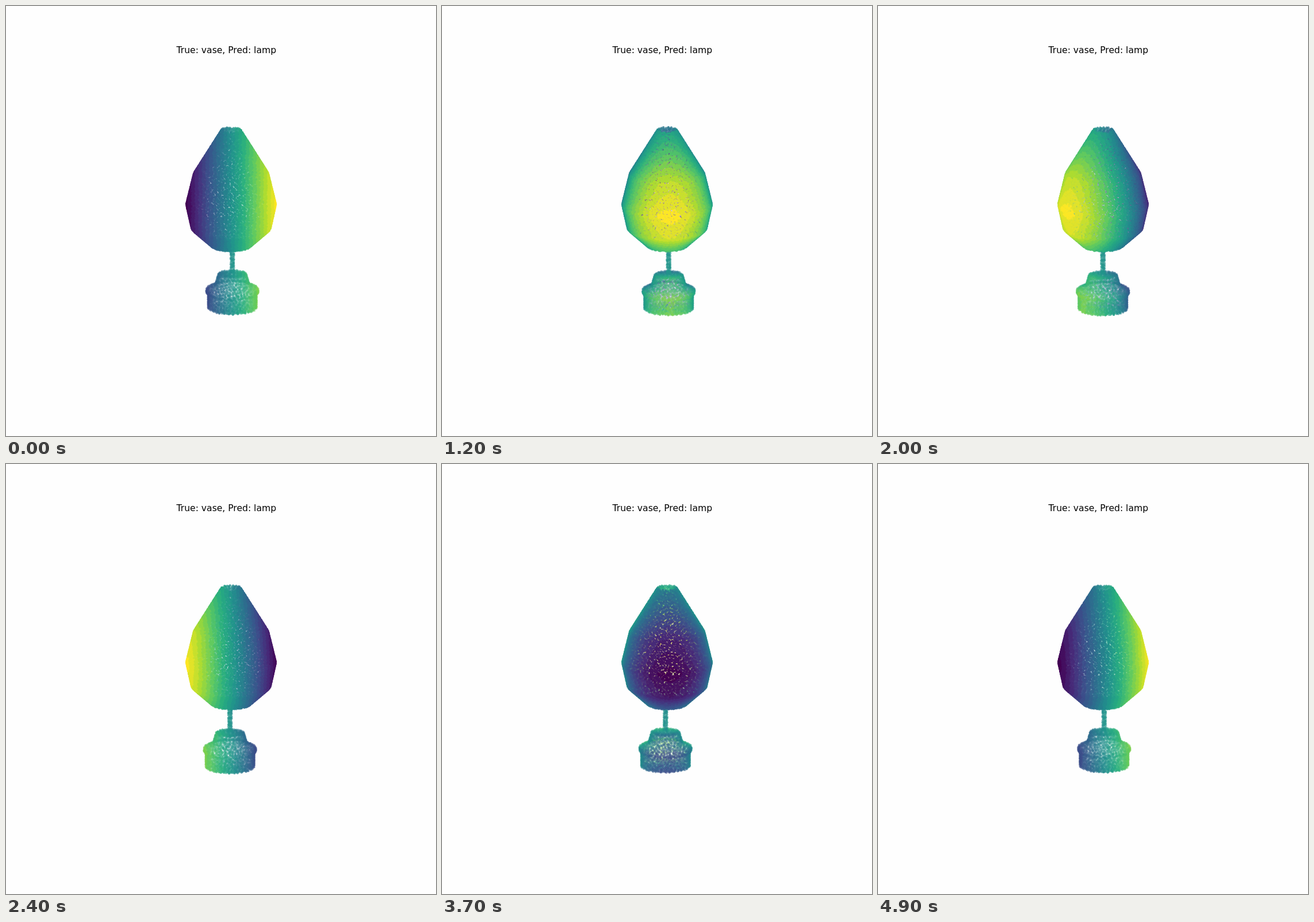
Write an HTML page with a canvas that moves like this. It is 748x748 px and loops after 5000 ms.

```html
<!DOCTYPE html>
<html lang="en">
<head>
<meta charset="utf-8">
<title>Rotating point cloud</title>
<style>
  html, body { margin: 0; width: 100%; height: 100%; overflow: hidden; background: #fefefe; }
  canvas { display: block; }
</style>
</head>
<body>
<canvas id="stage" width="748" height="748"></canvas>
<script>
const ctx = document.getElementById('stage').getContext('2d');
const STEPS = 50, STEP_MS = 100;
const CX = 391.5, MID_Y = 345, MAX_R = 77.5;
const TILT = 0.28, DOT = 2.2;
const GOLDEN = Math.PI * (3 - Math.sqrt(5));
const LEVELS = 26;

const viridis = [
  [68, 1, 84], [71, 44, 122], [59, 81, 139], [44, 113, 142], [33, 144, 141],
  [39, 173, 129], [92, 200, 99], [170, 220, 50], [253, 231, 37]
];

function viridisAt(v) {
  const s = Math.min(Math.max(v, 0), 1) * (viridis.length - 1);
  const i = Math.min(Math.floor(s), viridis.length - 2);
  const mix = viridis[i].map((c, k) => Math.round(c + (viridis[i + 1][k] - c) * (s - i)));
  return `rgb(${mix})`;
}

const palette = Array.from({ length: LEVELS }, (_, i) => viridisAt(i / (LEVELS - 1)));

let seed = 20417;
function rand() {
  seed = (seed * 1664525 + 1013904223) % 4294967296;
  return seed / 4294967296;
}

const points = [];

// Scatter dots evenly over the surface swept by a profile segment.
function sweep(r0, y0, r1, y1, density, ox = 0, oz = 0) {
  const len = Math.hypot(r1 - r0, y1 - y0);
  const count = Math.round(Math.PI * (r0 + r1) * len * density);
  const turn = rand() * 2 * Math.PI;
  for (let i = 0; i < count; i++) {
    const u = (i + 0.5) / count;
    const even = Math.abs(r1 - r0) < 0.01
      ? u
      : (Math.sqrt(r0 * r0 + u * (r1 * r1 - r0 * r0)) - r0) / (r1 - r0);
    const t = Math.min(Math.max(even + (rand() - 0.5) * 2.2 / len, 0), 1);
    const r = r0 + (r1 - r0) * t;
    const a = turn + i * GOLDEN + (rand() - 0.5) * 2.2 / Math.max(r, 2);
    const x = r * Math.cos(a) + ox;
    const z = r * Math.sin(a) + oz;
    const level = Math.round((x / MAX_R + 1) / 2 * (LEVELS - 1));
    points.push({
      x, z, y: y0 + (y1 - y0) * t,
      color: palette[Math.min(Math.max(level, 0), LEVELS - 1)],
      px: 0, py: 0, depth: 0
    });
  }
}

function chain(profile, density, ox, oz) {
  for (let i = 1; i < profile.length; i++) {
    sweep(...profile[i - 1], ...profile[i], density, ox, oz);
  }
}

// Shade
chain([[16.3, 215.5], [64.5, 292.5], [MAX_R, 345], [68.3, 386], [33, 417.5]], 0.1);
sweep(33, 417.5, 4, 418, 0.06);

// Stem and foot stand slightly off the shade's axis.
const footX = 3.4 * Math.cos(-50 * Math.PI / 180);
const footZ = 3.4 * Math.sin(-50 * Math.PI / 180);
sweep(2.8, 416, 2.8, 466, 0.1, footX, footZ);
chain([[3, 467], [24, 467], [29.5, 486]], 0.075, footX, footZ);
sweep(29.5, 486, 45, 493, 0.05, footX, footZ);
chain([[45, 493], [45, 498], [42, 501], [42, 525.5]], 0.085, footX, footZ);
sweep(42, 525.5, 2, 525.5, 0.045, footX, footZ);

function draw(step) {
  const angle = step / STEPS * 2 * Math.PI;
  const c = Math.cos(angle), s = Math.sin(angle);

  ctx.globalAlpha = 1;
  ctx.fillStyle = '#fefefe';
  ctx.fillRect(0, 0, 748, 748);

  ctx.fillStyle = '#000';
  ctx.font = '15.58px "DejaVu Sans", sans-serif';
  ctx.textAlign = 'center';
  ctx.fillText('True: vase, Pred: lamp', 383.3, 82.3);

  for (const p of points) {
    const front = p.x * s + p.z * c;
    p.px = CX + p.x * c - p.z * s;
    p.py = p.y + TILT * front;
    p.depth = front * 0.96 + (MID_Y - p.y) * 0.29;
  }
  points.sort((a, b) => a.depth - b.depth);

  for (const p of points) {
    const near = Math.min(Math.max((p.depth + 90) / 166, 0), 1);
    ctx.globalAlpha = 0.3 + 0.7 * near;
    ctx.fillStyle = p.color;
    ctx.beginPath();
    ctx.arc(p.px, p.py, DOT, 0, 2 * Math.PI);
    ctx.fill();
  }
}

let shown = -1;
const start = performance.now();

function tick() {
  const step = Math.floor((performance.now() - start) / STEP_MS) % STEPS;
  if (step !== shown) {
    shown = step;
    draw(step);
  }
  requestAnimationFrame(tick);
}
tick();
</script>
</body>
</html>
```
